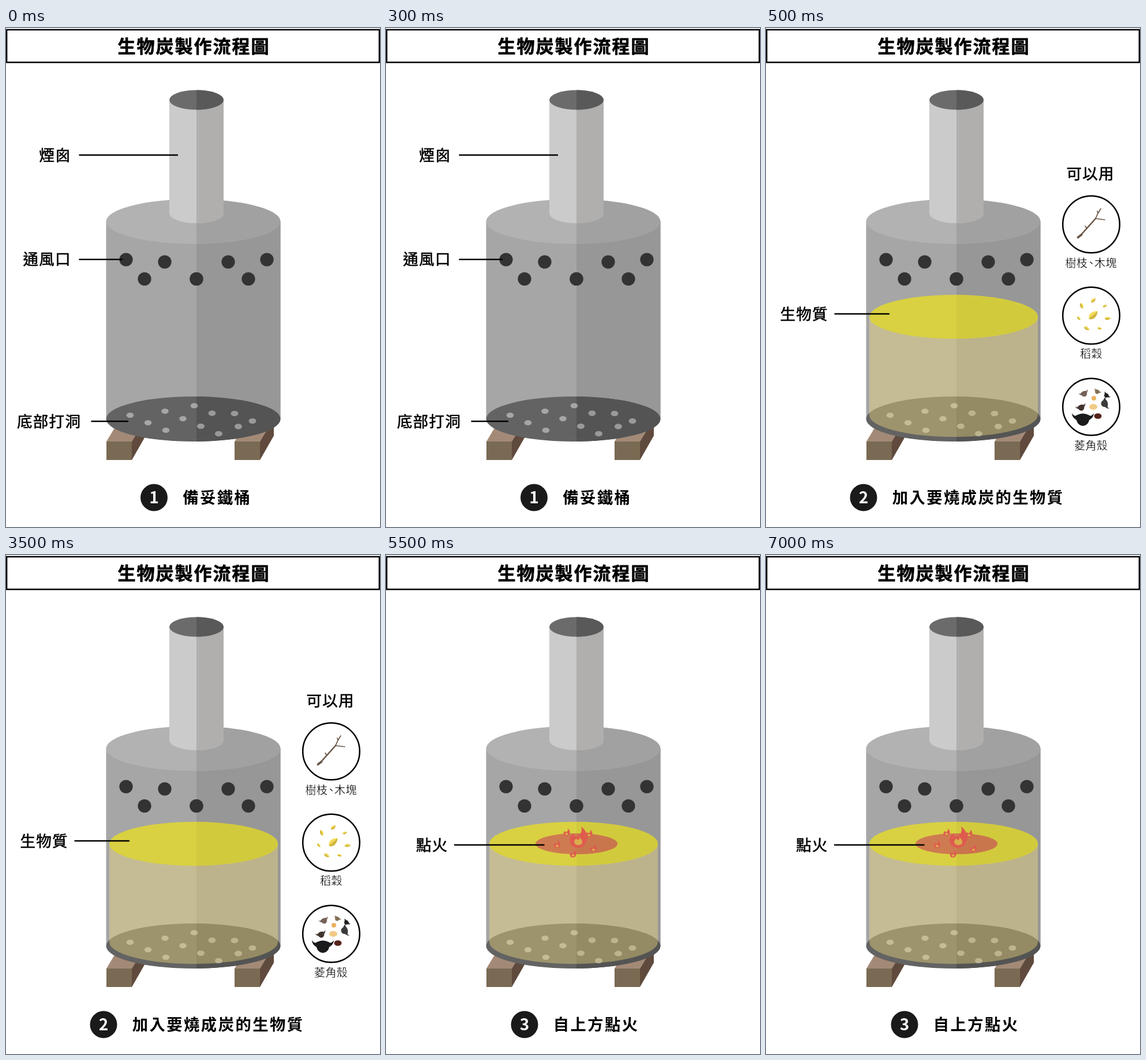
Recreate the animation shown at these times as an HTML page. Size 648 by 864 pixels, loop 8000 ms.

```html
<!DOCTYPE html>
<html lang="zh-Hant">
<head>
<meta charset="utf-8">
<title>生物炭製作流程圖</title>
<style>
html, body { margin: 0; width: 100%; height: 100%; overflow: hidden; background: #fff; }
svg { display: block; width: 100%; height: 100%; }
text { font-family: "Noto Sans CJK TC", "Noto Sans CJK", sans-serif; stroke-linejoin: round; }
.title { font-size: 31px; font-weight: 900; letter-spacing: 2px; stroke: #000; stroke-width: .7; }
.label { font-size: 26.5px; font-weight: 500; letter-spacing: 1.3px; stroke: #000; stroke-width: .6; }
.caption { font-size: 27.3px; font-weight: 700; letter-spacing: 2.5px; }
.number { font-size: 28px; font-weight: 700; fill: #fff; text-anchor: middle; }
.note { font-size: 19px; font-weight: 300; letter-spacing: .4px; stroke: #fff; stroke-width: .35; }
</style>
</head>
<body>
<svg id="stage" viewBox="0 0 648 864"></svg>
<script>
const SPLIT = 330;
const stage = document.getElementById('stage');

const repeat = (n, draw) => Array.from({ length: n }, (_, i) => draw(i)).join('');
const rad = deg => deg * Math.PI / 180;
const text = (kind, s, x, y) => `<text class="${kind}" x="${x}" y="${y}">${s}</text>`;
const ellipse = (x, y, rx, ry, fill = '') =>
  `<ellipse cx="${x}" cy="${y}" rx="${rx}" ry="${ry}" ${fill && `fill="${fill}"`}/>`;
const path = (d, fill = '', more = '') => `<path d="${d}" ${fill && `fill="${fill}"`} ${more}/>`;
const line = (d, width, color = '#000') =>
  path(d, 'none', `stroke="${color}" stroke-width="${width}"`);
const at = (x, y, turn, scale, body) =>
  `<g transform="translate(${x} ${y}) rotate(${turn}) scale(${scale})">${body}</g>`;

// Light left half, darker right half
const halves = (shape, left, right) =>
  `<g fill="${left}">${shape}</g><g fill="${right}" clip-path="url(#right)">${shape}</g>`;

const label = (s, x, y, x1, x2) => text('label', s, x, y + 9.7) + line(`M${x1} ${y}H${x2}`, 2.4);

const caption = (n, cx, s) =>
  ellipse(cx, 813, 23.5, 23.5, '#1a1a1a') +
  text('number', n, cx, 823) + text('caption', s, cx + 49.7, 823);

const leg = x =>
  path(`M${x} 716l24-40h44l-24 40z`, '#a38a77') +
  path(`M${x + 44} 716l24-40v30l-24 42z`, '#5f4a3d') +
  path(`M${x} 716h44v32h-44z`, '#7a6a53');

// Two staggered rows, mirrored about the split
const vents = () => [0, 55, 90, 122].map((dx, i) => {
  const y = i % 2 ? 407 - 2 * i : 434.5;
  return [-dx, dx].map(d => ellipse(SPLIT + d, y, 11.6, 11.6, '#333')).join('');
}).join('');

// Short diagonal rows: start and count
const holes = () => [[215, 670.5, 3], [275.5, 663.5, 4], [326, 654, 2], [396, 667.5, 2], [402.5, 690, 1]]
  .map(([x, y, n]) => repeat(n, i => ellipse(x + 31 * i, y + 13 * i, 6.3, 4.5))).join('');

const kiln = () =>
  leg(174) + leg(396) +
  halves(path('M173.5 335H475.5V677H173.5z'), '#a6a6a6', '#979797') +
  halves(ellipse(324.5, 335, 151, 38.7), '#b2b2b2', '#a1a1a1') +
  halves(path('M283 124V321a47 17 0 0 0 94 0V124z'), '#cbcbcb', '#b0afae') +
  halves(ellipse(330, 124.5, 47, 17), '#6b6b6b', '#595959') +
  vents() +
  halves(ellipse(324.5, 677, 151, 39), '#636363', '#545454') +
  halves(holes(), '#a6a6a6', '#999');

const biomass = () =>
  path('M179 500V670a146 38 0 0 0 292 0V500z', '#f3dd7b', 'fill-opacity=".4"') +
  halves(ellipse(325, 500, 146, 38), '#d9d141', '#d2ca3d');

const branch = () => `<g stroke-linecap="round">` +
  line('M540.5 362.5l6-4.5', 3.8, '#6b5646') +
  line('M545 359L571 330', 2.6, '#6b5646') +
  line('M571 330l4-9l5-8M571 330l16 2M556 347l-3-4M575 320l-1-3', 1.7, '#6b5646') + '</g>';

// One large grain inside a ring of small ones
function grains() {
  const grain = path('M-10 0C-6-7 3-7 10 0C3 7-6 7-10 0z', '#f3dc5c') +
    path('M-10 0C-4-1 4 1 10 0C3 7-6 7-10 0z', '#d0b443');
  return at(567, 497, -42, 1, grain) + repeat(7, i => {
    const a = rad(i * 360 / 7 - 90);
    return at(567 + 25.5 * Math.cos(a), 497 + 25.5 * Math.sin(a), 18 * i - 40, .53 - .13 * (i % 2), grain);
  });
}

function shells() {
  const shell = (x, y, turn, scale, fill) => at(x, y, turn, scale,
    path('M-19-10q5 7 9 3q10-5 20 0q4 4 9-3q0 7-8 12q-2 9-11 10q-9-1-11-10q-8-5-8-12z', fill));
  return shell(549, 677, 0, 1, '#1c1b1b') +
    shell(551, 633, -25, .45, '#76625a') +
    shell(574, 629.5, 30, .35, '#837056') +
    shell(590, 636, 45, .35, '#211f1f') +
    shell(546, 657, -20, .48, '#41342e') +
    shell(587, 650, 75, .55, '#3c3b3c') +
    ellipse(568, 641, 4, 4, '#eab261') +
    ellipse(567, 656, 7, 5, '#f2ca86') +
    ellipse(575, 672, 6.5, 4.8, '#552219');
}

const materials = () =>
  text('label', '可以用', 520.5, 262.3) +
  repeat(3, i => `<circle cx="563.5" cy="${340 + 158 * i}" r="49.3" fill="#fff" stroke="#000" stroke-width="2.5"/>`) +
  branch() + grains() + shells() +
  text('note', '樹枝', 518.5, 413.7) + text('note', '、', 554, 413.7) + text('note', '木塊', 569, 413.7) +
  text('note', '稻穀', 544, 570.7) + text('note', '菱角殼', 534, 730.2);

// One large flame inside a ring of small ones
function fire() {
  const flame =
    path('M5-20C17-11 17 0 14 7C11 14 5 17 0 17C-8 17-15 12-15 4C-15-1-12-6-7-8C-7-4-6-3-4-2C4-5 8-11 5-20z', '#df5b4e') +
    path('M2-4C1 0 8 2 7 8C6 14-6 14-7 7C-7 4-5 2-3 1C-2 3 0 4 1 3C3 1 3-1 2-4z', '#d9ae4c');
  return halves(ellipse(330, 500, 71, 18), '#cf7b51', '#ca764d') +
    at(333, 490, 0, 1, flame) +
    repeat(5, i => {
      const a = rad(30 + 70 * i);
      return at(330 + 34 * Math.cos(a), 498 + 20 * Math.sin(a), 0, .36, flame);
    });
}

const steps = [
  { end: 500, art: label('煙囪', 57.5, 220, 126.5, 298) + label('通風口', 29.5, 400.7, 126.5, 202) +
      label('底部打洞', 19, 681, 147.5, 212) + caption(1, 256.5, '備妥鐵桶') },
  { end: 5500, art: biomass() + label('生物質', 24.5, 495, 118.5, 214) + materials() +
      caption(2, 169, '加入要燒成炭的生物質') },
  { end: 8000, art: biomass() + fire() + label('點火', 52, 502, 118, 274.5) + caption(3, 240, '自上方點火') }
];

stage.innerHTML =
  `<clipPath id="right"><rect x="${SPLIT}" width="318" height="864"/></clipPath>` +
  line('M1.2 3H646.8V59.5H1.2z', 2.3) +
  text('title', '生物炭製作流程圖', 193.5, 43.3) + kiln() +
  steps.map(s => `<g class="step">${s.art}</g>`).join('');

const groups = stage.querySelectorAll('.step');

function draw(now) {
  const t = now % 8000;
  const current = steps.findIndex(s => t < s.end);
  groups.forEach((g, i) => g.setAttribute('display', i === current ? 'inline' : 'none'));
}

function tick() {
  draw(performance.now());
  requestAnimationFrame(tick);
}
tick();
</script>
</body>
</html>
```
